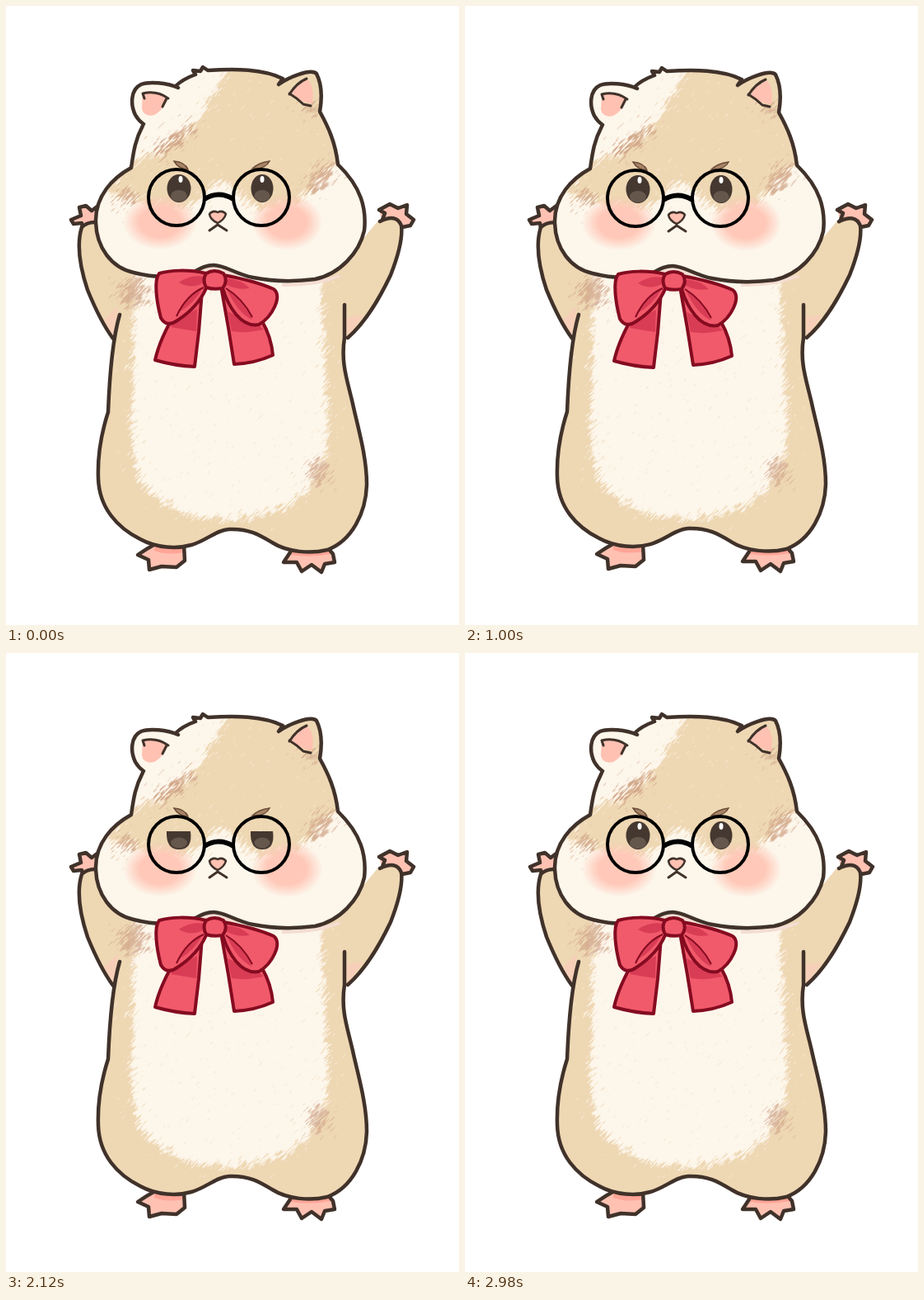
An HTML page without scripts for the animation above (3.38 s loop, 550 px wide and 750 px high).

```html
<!DOCTYPE html>
<html lang="en">
<head>
<meta charset="utf-8">
<title>Hamster</title>
<style>
html, body { margin: 0; width: 100%; height: 100%; overflow: hidden; background: #fff; }
svg { display: block; width: 550px; height: 750px; animation: pose 3380ms step-end infinite; }

/* head, bow, feet and hand shifts in px, torso stretch, open eyes */
@keyframes pose {
  0%      { --head: 0; --bow: 0; --feet: 0; --hand: 0; --torso: 1; --open: 1; }
  11.834% { --head: 3; --bow: 3; --feet: -2; --hand: -2; --torso: .9934; --open: 1; }
  17.751% { --head: 3; --bow: 2; --feet: -1; --hand: -2; --torso: .996; --open: 1; }
  21.598% { --head: 3; --bow: 3; --feet: -2; --hand: -2; --torso: .9934; --open: 1; }
  29.586% { --head: 1; --bow: 1; --feet: -1; --hand: -1; --torso: .997; --open: 1; }
  33.432% { --head: 0; --bow: 0; --feet: 0; --hand: 0; --torso: 1; --open: 1; }
  35.503% { --head: 0; --bow: 0; --feet: 0; --hand: 0; --torso: 1; --open: 0; }
  39.349% { --head: 3; --bow: 3; --feet: -2; --hand: -2; --torso: .9934; --open: 0; }
  43.195% { --head: 3; --bow: 2; --feet: -1; --hand: -2; --torso: .996; --open: 0; }
  47.041% { --head: 3; --bow: 3; --feet: -2; --hand: -2; --torso: .9934; --open: 0; }
  50.888% { --head: 3; --bow: 2; --feet: -1; --hand: -2; --torso: .991; --open: 0; }
  53.846% { --head: 3; --bow: 3; --feet: -2; --hand: -2; --torso: .988; --open: 0; }
  58.876% { --head: 1; --bow: 1; --feet: -1; --hand: -1; --torso: .996; --open: 0; }
  62.722% { --head: 0; --bow: 0; --feet: 0; --hand: 0; --torso: 1; --open: 0; }
  68.639% { --head: 0; --bow: 0; --feet: 0; --hand: 0; --torso: 1; --open: 1; }
  72.485% { --head: 3; --bow: 2; --feet: -2; --hand: -2; --torso: .988; --open: 1; }
  78.402% { --head: 3; --bow: 3; --feet: -2; --hand: -2; --torso: .991; --open: 1; }
  82.249% { --head: 3; --bow: 2; --feet: -2; --hand: -2; --torso: .988; --open: 1; }
  88.166%, 100% { --head: 0; --bow: 0; --feet: 0; --hand: 0; --torso: 1; --open: 1; }
}
.head { transform: translateY(calc(var(--head) * 1px)); }
.bow { transform: translateY(calc(var(--bow) * 1px)); }
.feet { transform: translateY(calc(var(--feet) * 1px)); }
.hands { transform: translateX(calc(var(--hand) * 1px)); }
.torso { transform-origin: 270px 330px; transform: scaleY(var(--torso)); }
.open { opacity: var(--open); }
.half { opacity: calc(1 - var(--open)); }

.line { fill: none; stroke: #40322a; stroke-width: 4.5; stroke-linecap: round; stroke-linejoin: round; }
.pink { fill: #ffc1b2; }
.deep { fill: #ffa597; }
.cream { fill: #fdf6eb; }
.tan { fill: #eed7b3; }
.brown { fill: #cfa386; fill-opacity: .72; }
.dark { fill: #453830; }
.soft { fill: #65574c; }
.fur { filter: url(#fur); }
</style>
</head>
<body>
<svg viewBox="0 0 550 750">
<defs>
  <!-- dissolves a shape's edge into streaks along local x -->
  <filter id="fur" x="-40%" y="-40%" width="180%" height="180%" color-interpolation-filters="sRGB">
    <feMorphology in="SourceGraphic" operator="dilate" radius="18" result="paint"/>
    <feGaussianBlur in="SourceGraphic" stdDeviation="7" result="edge"/>
    <feTurbulence type="fractalNoise" baseFrequency=".08 .6" numOctaves="2" seed="4"/>
    <feColorMatrix values="0 0 0 0 0  0 0 0 0 0  0 0 0 0 0  1.7 0 0 0 -.35" result="noise"/>
    <feComposite in="edge" in2="noise" operator="arithmetic" k2=".5" k3=".5"/>
    <feComponentTransfer result="mask"><feFuncA type="linear" slope="10" intercept="-4.5"/></feComponentTransfer>
    <feComposite in="paint" in2="mask" operator="in"/>
  </filter>
  <radialGradient id="blush">
    <stop offset=".55" stop-color="#ffc8b8"/>
    <stop offset="1" stop-color="#ffc8b8" stop-opacity="0"/>
  </radialGradient>
  <path id="skull" d="M166 145 C157 162 155 175 152 196 C130 208 108 230 109 262 C110 293 128 317 155 323 C178 329 202 329 222 325 C235 319 241 314 252 314 C266 314 279 325 300 329 C325 334 352 334 375 331 C405 325 429 299 435 272 C438 245 431 219 403 192 C400 165 391 146 381 128 C384 111 383 94 377 82 C370 75 342 87 331 95 L336 88 C312 76 278 76 245 78 L239 74 L236 79 L227 78 L230 83 C219 87 211 92 206 97 L209 99 C195 93 174 91 164 95 C151 101 151 120 157 132 Q161 139 167 143"/>
  <path id="trunk" d="M92 268 C85 290 91 320 99 344 C108 366 119 388 130 403 C126 435 126 465 124 492 C115 520 111 545 112 572 C113 608 135 632 163 646 C183 657 208 658 225 653 C243 648 255 635 271 634 C295 633 308 641 323 650 C342 662 370 664 390 659 C420 648 437 614 438 580 C438 545 427 510 421 482 C415 455 409 433 413 402 C438 382 454 353 467 326 C476 303 482 282 480 266 Q474 251 452 260 L410 310 L130 310 L108 262 Q98 262 92 268Z"/>
  <clipPath id="skullClip"><use href="#skull"/></clipPath>
  <clipPath id="trunkClip"><use href="#trunk"/></clipPath>
</defs>

<g class="feet">
  <path class="pink" d="M181 652 Q170 658 160 665 L173 671 L174 683 L189 679 L207 680 L217 672 L216 650Z"/>
  <path class="deep" d="M180 653 H215 V662 Q195 666 180 660Z"/>
  <path class="line" d="M181 652 Q170 658 160 665 L173 671 L174 683 L189 679 L207 680 L217 672 L216 652"/>
  <path class="pink" d="M345 660 L337 674 L353 674 L359 685 L371 677 L383 686 L387 676 L399 674 L397 664 L391 656Z"/>
  <path class="deep" d="M346 658 H392 L394 664 Q370 669 346 665Z"/>
  <path class="line" d="M345 662 L337 674 L353 674 L359 685 L371 677 L383 686 L387 676 L399 674 L397 664 L391 657"/>
</g>

<g class="hands">
  <path class="pink" d="M112 242 L104 248 L97 242 L89 244 L91 254 L79 259 L82 264 L92 263 L93 270 L112 264Z"/>
  <path class="line" d="M112 242 L104 248 L97 242 L89 244 L91 254 L79 259 L82 264 L92 263 L93 269"/>
  <path class="pink" d="M453 247 L466 240 L476 245 L487 241 L486 252 L495 259 L491 266 L481 266 L481 273 L457 262Z"/>
  <path class="line" d="M457 259 L460 251 L453 247 L466 240 L476 245 L487 241 L486 252 L495 259 L491 266 L481 268"/>
</g>

<g class="torso">
  <use href="#trunk" class="tan"/>
  <g clip-path="url(#trunkClip)">
    <g class="fur" transform="rotate(-45)"><path class="cream" transform="rotate(45)" d="M154 300 H382 C382 350 386 400 388 450 C392 500 394 545 376 575 C355 607 315 620 270 622 C225 622 185 608 164 575 C148 545 154 495 154 455 C152 425 158 400 155 375Z"/></g>
    <g class="fur" transform="rotate(-45)"><g class="brown" transform="rotate(45)">
      <ellipse cx="154" cy="347" rx="19" ry="21"/>
      <ellipse cx="379" cy="565" rx="14" ry="18"/>
    </g></g>
    <path d="M117 382 L136 364 L131 402Z M413 378 L434 374 L415 401Z" fill="#f7cfb8"/>
    <path d="M232 320 Q253 309 280 325 L270 335 H240Z M335 338 Q375 339 405 327" fill="#f4ddd2" stroke="#f4ddd2" stroke-width="4"/>
  </g>
  <path class="line" d="M92 268 C85 290 91 320 99 344 C108 366 119 388 130 403 M138 374 C131 398 126 440 124 492 C115 520 111 545 112 572 C113 608 135 632 163 646 C183 657 208 658 225 653 C243 648 255 635 271 634 C295 633 308 641 323 650 C342 662 370 664 390 659 C420 648 437 614 438 580 C438 545 427 510 421 482 C415 455 406 433 411 402 L411 362 M415 402 C438 382 454 353 467 326 C476 303 482 282 480 266 Q474 251 454 261 M108 262 Q98 262 92 268"/>
</g>

<g class="head">
  <use href="#skull" class="cream"/>
  <g clip-path="url(#skullClip)">
    <g class="fur" transform="rotate(-45)"><path class="tan" transform="rotate(45)" d="M282 60 H400 L420 188 Q389 194 374 216 Q358 242 330 246 Q290 247 278 222 Q262 199 247 222 Q232 246 200 246 Q165 246 156 231 L120 232 L140 193 Q190 181 208 158 Q234 144 245 117 Q262 88 282 60Z"/></g>
    <g class="fur" transform="rotate(-45)"><g class="brown" transform="rotate(45)">
      <ellipse cx="213" cy="157" rx="21" ry="10" transform="rotate(-32 213 157)"/>
      <ellipse cx="188" cy="176" rx="13" ry="10"/>
      <ellipse cx="147" cy="231" rx="15" ry="11"/>
      <ellipse cx="383" cy="208" rx="24" ry="13" transform="rotate(-48 383 208)"/>
      <ellipse cx="372" cy="124" rx="14" ry="10"/>
    </g></g>
    <g fill="url(#blush)">
      <ellipse cx="187" cy="262" rx="45" ry="33"/>
      <ellipse cx="341" cy="262" rx="43" ry="34"/>
    </g>
  </g>
  <path class="pink" d="M166 106 Q183 102 197 112 Q191 126 180 132 Q167 135 165 124Z"/>
  <path class="pink" d="M346 107 Q354 92 365 88 Q375 96 372 118 Q361 118 346 107Z"/>
  <path class="line" style="stroke-width:3" d="M166 106 Q183 102 197 112 M166 106 L168 112 M195 112 L190 122 M344 107 Q353 93 365 88 M344 106 Q354 112 361 119 L370 121"/>
  <use href="#skull" class="line"/>

  <g class="open">
    <ellipse class="dark" cx="210" cy="221" rx="14.5" ry="17"/>
    <ellipse class="soft" cx="210" cy="230" rx="10" ry="7"/>
    <ellipse cx="212" cy="210" rx="2.5" ry="4" fill="#fff"/>
    <ellipse class="dark" cx="311" cy="221" rx="13.5" ry="17"/>
    <ellipse class="soft" cx="311" cy="230" rx="9.5" ry="7"/>
    <ellipse cx="311" cy="210" rx="2.5" ry="4" fill="#fff"/>
  </g>
  <g class="half">
    <path class="dark" d="M195 216 H224 Q227 238 210 238 Q194 238 195 216Z M297 216 H324 Q327 238 311 238 Q296 238 297 216Z"/>
    <ellipse class="soft" cx="210" cy="230" rx="10" ry="6.5"/>
    <ellipse class="soft" cx="311" cy="230" rx="9.5" ry="6.5"/>
  </g>

  <path d="M204 188 Q217 189 221 198 Q210 198 204 188Z M320 188 Q306 190 299 197 Q315 198 320 188Z" fill="#a98566" stroke="#6b4e3b" stroke-width="1.5"/>
  <g fill="none" stroke="#000" stroke-width="4">
    <circle cx="207" cy="232" r="34"/>
    <circle cx="310" cy="232" r="34"/>
    <path d="M241 234 Q258 223 276 234" stroke-width="6"/>
  </g>
  <path class="line" style="fill:#ffc1b2;stroke-width:2.5" d="M247 252 Q251 247 257 250 Q263 247 267 252 Q265 259 257 263 Q248 259 247 252Z"/>
  <path class="line" style="stroke-width:3" d="M247 272 L257 265 L268 272"/>
</g>

<g class="bow" fill="#f15a6b" stroke="#840b20" stroke-width="4" stroke-linejoin="round">
  <path d="M207 370 Q187 402 181 429 Q205 436 229 437 L234 395 L238 345Z"/>
  <path d="M262 345 L270 390 L277 434 Q302 433 324 423 Q322 401 311 382Z"/>
  <path d="M205 381 L232 367 L231 394 Q216 392 200 389Z M269 370 L307 387 L313 392 Q291 397 274 394Z" fill="#d93c55" stroke="none"/>
  <path d="M243 324 C222 319 199 320 186 324 C179 332 183 359 188 378 Q195 390 208 381 C222 372 236 358 243 342Z"/>
  <path d="M264 326 C286 330 309 336 325 343 C336 352 323 377 307 386 C285 390 270 364 263 342Z"/>
  <path d="M240 328 Q224 325 210 335 Q226 344 240 335Z M267 330 Q285 331 296 342 Q280 345 267 337Z M239 341 Q219 350 208 372 Q228 362 239 341Z M268 343 Q289 355 299 380 Q281 372 268 343Z" fill="#d93c55" stroke="none"/>
  <path d="M240 341 Q219 350 207 376 M267 342 Q287 354 299 377" fill="none" stroke-width="2"/>
  <path d="M243 324 Q253 318 264 324 Q270 333 263 342 Q252 344 243 341 Q238 332 243 324Z"/>
</g>
</svg>
</body>
</html>
```
